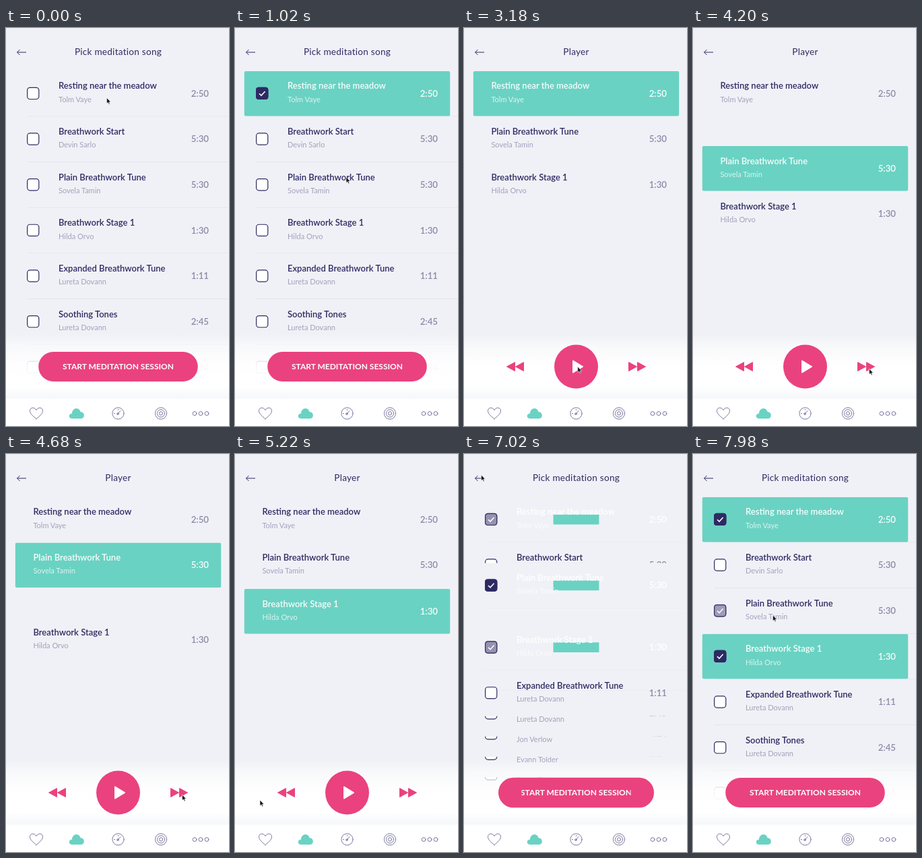
Recreate the animation shown at these times as an HTML page. Size 331x590 px, loop 8000 ms.

```html
<!DOCTYPE html>
<html lang="en">
<head>
<meta charset="utf-8">
<title>Song picker</title>
<style>
  html, body { margin: 0; width: 100%; height: 100%; overflow: hidden; background: #f0f1f6; }
  svg { display: block; width: 100%; height: 100%; }
  text { font-family: Lato, "Open Sans", sans-serif; fill: #2d2a63; }
  .head { font-size: 13.6px; letter-spacing: .25px; text-anchor: middle; }
  .title { font-size: 13px; font-weight: 600; }
  .artist { font-size: 11px; fill: #a3a1bd; }
  .time { font-size: 13.2px; font-weight: 600; fill: #8b89a8; text-anchor: end; }
  .lit .title, .lit .time { fill: #fff; fill-opacity: .95; }
  .lit .artist { fill: #fff; fill-opacity: .75; }
  .start { font-size: 12px; font-weight: 700; fill: #fff; text-anchor: middle; }
  .pink { fill: #ea427e; }
  .icon { fill: none; stroke: #7b789f; stroke-width: 1; stroke-linecap: round; stroke-linejoin: round; }
</style>
</head>
<body>
<svg viewBox="0 0 331 590">
  <defs>
    <linearGradient id="fade" x1="0" y1="0" x2="0" y2="1">
      <stop offset="0" stop-color="#fff" stop-opacity="0"/>
      <stop offset=".18" stop-color="#fff" stop-opacity=".55"/>
      <stop offset=".48" stop-color="#fff" stop-opacity=".94"/>
      <stop offset=".8" stop-color="#fff"/>
      <stop offset="1" stop-color="#f6f7fa"/>
    </linearGradient>
    <clipPath id="labelClip"><rect id="labelBox" y="480" height="44"/></clipPath>
  </defs>
  <rect width="331" height="590" fill="#f0f1f6"/>
  <g id="others"></g>
  <g id="chosen"></g>

  <path d="M30 36H16.5M20.5 32L16.5 36L20.5 40" fill="none" stroke="#2d2a63"/>
  <text class="head" id="pickHead" x="166.5" y="40.3">Pick meditation song</text>
  <text class="head" id="playHead" x="166.5" y="40.3">Player</text>

  <rect y="453" width="331" height="97" fill="url(#fade)"/>
  <rect class="pink" id="button"/>
  <text class="start" x="166.5" y="506.2" clip-path="url(#labelClip)">START MEDITATION SESSION</text>
  <g id="controls">
    <path d="M162 493.5L176 502L162 510.5Z" fill="#fff" stroke="#fff" stroke-width="2" stroke-linejoin="round"/>
    <path class="pink" stroke="#ea427e" stroke-linejoin="round" d="M75.5 495.5V508.5L63.5 502ZM88.5 495.5V508.5L76.5 502ZM244.5 495.5V508.5L256.5 502ZM257.5 495.5V508.5L269.5 502Z"/>
  </g>

  <rect y="549.5" width="331" height="41" fill="#fff"/>
  <g class="icon">
    <path d="M45 579.5C41 576 35.5 572 35.5 567.5C35.5 562 42.5 561.5 45 566.5C47.5 561.5 54.5 562 54.5 567.5C54.5 572 49 576 45 579.5Z"/>
    <circle cx="166.5" cy="571.3" r="8.6"/>
    <path d="M165.5 572.5L170 567.5M160.5 571.5h1M166.5 565.3v1"/>
    <circle cx="166" cy="572" r="1.3"/>
    <circle cx="230" cy="571.3" r="8.6"/>
    <circle cx="230" cy="571.3" r="5.6"/>
    <circle cx="230" cy="571.3" r="2.6"/>
    <circle cx="280" cy="571.5" r="2.9"/>
    <circle cx="289" cy="571.5" r="2.9"/>
    <circle cx="298" cy="571.5" r="2.9"/>
  </g>
  <path d="M98.5 579C92 579 92.5 571.5 98 571.5C98 562.5 109 561.5 110.5 569C117.5 569 117.5 579 111.5 579Z" fill="#6ad2c3"/>
  <path id="cursor" d="M0 0V8.6L2 6.8L3.3 9.8L4.7 9.2L3.4 6.3H6Z" fill="#111" stroke="#fff" stroke-width=".6"/>
</svg>
<script>
const LOOP = 8000, TOP = 63.9, PITCH = 67.65, ROW = 66.5, GAP = 43.5;
const $ = id => document.getElementById(id);
const smooth = x => { x = Math.min(1, Math.max(0, x)); return x * x * (3 - 2 * x); };

// Eased value of keyframes [time, value] at time t
function track(t, keys, axis = 1) {
  let prev = keys[0];
  for (const key of keys) {
    if (t < key[0]) {
      const k = smooth((t - prev[0]) / (key[0] - prev[0] || 1));
      return prev[axis] + (key[axis] - prev[axis]) * k;
    }
    prev = key;
  }
  return prev[axis];
}

// 0 in the list, 1 in the player, with the given ranges in and out
const inPlayer = (t, in0, in1, out0, out1) =>
  smooth((t - in0) / (in1 - in0)) * (1 - smooth((t - out0) / (out1 - out0)));

// lit: spans of the highlight; mark: check fill; gap: space opened below
const songs = [
  { title: 'Resting near the meadow', artist: 'Tolm Vaye', time: '2:50',
    lit: [[280, 3920], [6960, 9000]],
    mark: [[280, 0], [560, 1], [4000, 1], [4001, 0], [6900, 0], [7140, 1]],
    gap: [[3300, 0], [3600, 1], [4200, 1], [4500, 0]] },
  { title: 'Breathwork Start', artist: 'Devin Sarlo', time: '5:30' },
  { title: 'Plain Breathwork Tune', artist: 'Sovela Tamin', time: '5:30',
    lit: [[1120, 2600], [3920, 4720], [5700, 6760], [6960, 7760]],
    mark: [[1120, 0], [1400, 1], [7760, 1], [8180, 0]],
    gap: [[4200, 0], [4500, 1], [4990, 1], [5240, 0], [6000, 0], [6300, 1], [6780, 1], [7300, 0]] },
  { title: 'Breathwork Stage 1', artist: 'Hilda Orvo', time: '1:30',
    lit: [[1700, 2600], [4720, 5700], [6960, 9000]],
    mark: [[1700, 0], [1980, 1], [4000, 1], [4001, 0], [6900, 0], [7140, 1]] },
  { title: 'Expanded Breathwork Tune', artist: 'Lureta Dovann', time: '1:11' },
  { title: 'Soothing Tones', artist: 'Lureta Dovann', time: '2:45' },
  { title: 'Evening Calm', artist: 'Jon Verlow', time: '4:24' },
  { title: 'Soft Rain', artist: 'Evann Tolder', time: '3:14' },
  { title: 'Slow River', artist: 'Evann Tolder', time: '2:36' }
];

const cursorPath = [
  [0, 149.5, 103.5], [420, 150, 104], [960, 165, 221], [1240, 165, 221],
  [1640, 168, 288], [1860, 168, 288], [2400, 191, 480], [2560, 193, 492],
  [2900, 193, 494], [3250, 166, 503], [3480, 166, 503], [3850, 261.5, 505],
  [4800, 261.5, 505], [5220, 37, 513], [5600, 73, 500], [5950, 73, 500],
  [6700, 25.5, 31], [7150, 25.5, 31], [7660, 118.5, 239], [8000, 118.5, 239]
];

function make(name, attrs, parent, text) {
  const el = document.createElementNS('http://www.w3.org/2000/svg', name);
  set(el, attrs);
  if (text) el.textContent = text;
  parent.append(el);
  return el;
}
function set(el, attrs) {
  for (const name in attrs) el.setAttribute(name, attrs[name]);
}

function buildRow(song) {
  const row = song.row = make('g', {}, $(song.lit ? 'chosen' : 'others'));
  make('rect', { width: 331, height: ROW + 1, fill: '#f0f1f6' }, row);
  song.line = make('rect', { x: 31, width: 300, height: 1, fill: '#e5e6ed' }, row);
  if (song.lit) song.glow = make('rect', { x: -152.7, y: -ROW / 2, width: 305.4, height: ROW, rx: 2, fill: '#6ad2c3' }, row);
  song.box = make('g', {}, row);
  make('rect', { x: 31.6, y: 24.4, width: 17.2, height: 17.2, rx: 4, fill: '#fff', stroke: '#2d2a63', 'stroke-width': 1.2 }, song.box);
  if (song.mark) {
    song.check = make('g', {}, song.box);
    make('rect', { x: 31, y: 23.8, width: 18.4, height: 18.4, rx: 4, fill: '#2d2a63' }, song.check);
    make('path', { d: 'M36 33.3L39 36.2L44.6 30', fill: 'none', stroke: '#fff', 'stroke-width': 1.5 }, song.check);
  }
  song.label = make('g', {}, row);
  make('text', { class: 'title', x: 78, y: 26.6 }, song.label, song.title);
  make('text', { class: 'artist', x: 78, y: 45.8 }, song.label, song.artist);
  make('text', { class: 'time', x: 301, y: 37.8 }, row, song.time);
}
// Earlier rows cover later ones while the list folds
[...songs].reverse().forEach(buildRow);

function drawRows(t) {
  const folded = inPlayer(t, 2600, 3120, 6780, 7300);
  const shift = -37.6 * inPlayer(t, 2600, 2950, 6780, 7000);
  const boxShown = 1 - inPlayer(t, 2600, 2800, 6780, 6860);
  set($('others'), { opacity: 1 - inPlayer(t, 2720, 3050, 6780, 6900) });
  let y = TOP;
  for (const song of songs) {
    const height = song.lit ? PITCH : PITCH * (1 - folded);
    set(song.row, { transform: `translate(0 ${y})` });
    set(song.line, { y: height - 1.2, opacity: 1 - folded });
    if (song.lit) {
      const scale = Math.max(...song.lit.map(([on, off]) =>
        smooth((t - on) / 200) * (1 - smooth((t - off) / 180))));
      const lit = song.lit.some(([on, off]) => t >= on && t < off);
      set(song.row, { class: lit ? 'lit' : '' });
      set(song.glow, { transform: `translate(166.5 ${ROW / 2}) scale(${scale})` });
      set(song.label, { transform: `translate(${shift} 0)` });
      set(song.box, { opacity: boxShown });
      set(song.check, { opacity: track(t, song.mark) });
    }
    y += height + (song.gap ? GAP * track(t, song.gap) : 0);
  }
}

function drawControls(t) {
  const round = inPlayer(t, 2600, 2900, 6780, 7050);
  const w = 236.5 - 171.5 * round, h = 44 + 21 * round;
  set($('button'), { x: 166.5 - w / 2, y: 502 - h / 2, width: w, height: h, rx: h / 2 });
  const labelW = Math.max(0, w - 69);
  set($('labelBox'), { x: 166.5 - labelW / 2, width: labelW });
  set($('controls'), { opacity: inPlayer(t, 2800, 3100, 6780, 6900) });
  set($('pickHead'), { opacity: 1 - inPlayer(t, 2600, 2800, 6800, 6960) });
  set($('playHead'), { opacity: inPlayer(t, 2750, 2950, 6780, 6880) });
}

function frame(now) {
  const t = now % LOOP;
  drawRows(t);
  drawControls(t);
  set($('cursor'), { transform: `translate(${track(t, cursorPath)} ${track(t, cursorPath, 2)})` });
  requestAnimationFrame(frame);
}
frame(0);
</script>
</body>
</html>
```
